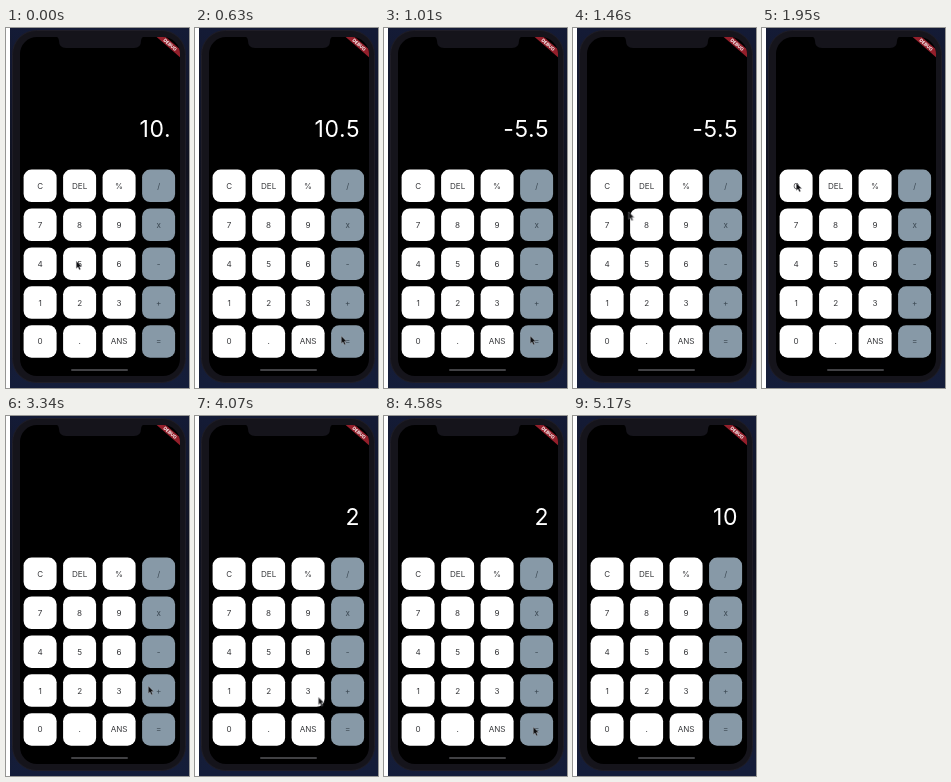
An HTML page that plays this animation: 183 by 360 pixels, repeating every 5.24 s.

```html
<!DOCTYPE html>
<html lang="en">
<head>
<meta charset="utf-8">
<title>Calculator</title>
<style>
html, body { margin: 0; width: 100%; height: 100%; overflow: hidden; background: #fff; }
svg { display: block; width: 100vw; height: 100vh; }
text { font-family: Inter, Roboto, sans-serif; }
.key { font-size: 8.1px; text-anchor: middle; fill: #38393c; }
.key.op { fill: #3a4751; }
.reading { font-size: 23px; letter-spacing: .6px; text-anchor: end; fill: #fff; }
#readings { animation: readings 5240ms step-end infinite; }
#pointer { animation: pointer 5240ms ease-in-out infinite; }

/* Each reading sits 40px below the previous one */
@keyframes readings {
  0% { transform: translateY(0); }
  2.7% { transform: translateY(-40px); }
  17.4% { transform: translateY(-80px); }
  34.5% { transform: translateY(-120px); }
  49.8% { transform: translateY(-160px); }
  61% { transform: translateY(-200px); }
  71.8% { transform: translateY(-240px); }
  90.07%, 100% { transform: translateY(-280px); }
}
@keyframes pointer {
  0%, 4% { transform: translate(70px, 233px); }
  11.4%, 22.5% { transform: translate(146px, 308px); animation-timing-function: ease-in; }
  27.86% { transform: translate(55.5px, 184px); animation-timing-function: ease-out; }
  32.4%, 39.3% { transform: translate(34px, 155px); }
  45.8%, 51.9% { transform: translate(73px, 198px); }
  58.8%, 63.8% { transform: translate(142px, 270px); }
  70.2%, 73.4% { transform: translate(72px, 273px); animation-timing-function: ease-in; }
  77.67% { transform: translate(123px, 281px); animation-timing-function: ease-out; }
  81.7%, 94% { transform: translate(149px, 311px); animation-timing-function: ease-in; }
  98.5%, 100% { transform: translate(185px, 306px); }
}
</style>
</head>
<body>
<svg viewBox="0 0 183 360" preserveAspectRatio="none">
  <defs>
    <linearGradient id="desk" x2="0" y2="1">
      <stop offset="0" stop-color="#141b36"/>
      <stop offset=".4" stop-color="#10121f"/>
      <stop offset=".75" stop-color="#191c30"/>
      <stop offset="1" stop-color="#141d3a"/>
    </linearGradient>
    <clipPath id="screen"><rect x="14" y="9" width="160" height="339" rx="17"/></clipPath>
    <clipPath id="display"><rect x="14" y="84" width="160" height="32"/></clipPath>
  </defs>
  <rect x="4" width="179" height="360" fill="url(#desk)"/>
  <rect x="6.5" y="2.5" width="173" height="352" rx="24" fill="#15141b" stroke="#1f1d26"/>
  <g clip-path="url(#screen)">
    <rect x="14" y="9" width="160" height="339" fill="#000"/>
    <path d="M49 8Q53 9 53 13Q53 20 60 20H128Q135 20 135 13Q135 9 139 8Z" fill="#15141b"/>
    <g transform="translate(164.2 16.8) rotate(41)">
      <rect x="-24" y="-3" width="48" height="6" fill="#941f2b"/>
      <text y="1.7" font-size="4.6" font-weight="700" text-anchor="middle" fill="#fff">DEBUG</text>
    </g>
    <rect x="65" y="341" width="57" height="2" rx="1" fill="#414144"/>
  </g>
  <g clip-path="url(#display)"><g id="readings"></g></g>
  <g id="keys"></g>
  <path id="pointer" d="M.3 0V7.4L2 5.9L3.3 8.8L4.6 8.2L3.4 5.4H5.7Z" fill="#101012" stroke="#b4b4b8" stroke-width=".4"/>
</svg>
<script>
const add = (parent, tag, attrs, content = "") => {
  const node = document.createElementNS("http://www.w3.org/2000/svg", tag);
  for (const name in attrs) node.setAttribute(name, attrs[name]);
  node.textContent = content;
  parent.append(node);
};

const readings = document.getElementById("readings");
["10.", "10.5", "-5.5", "", "8", "", "2", "10"].forEach((value, i) =>
  add(readings, "text", { class: "reading", x: 165.2, y: 108.7 + 40 * i }, value));

const keys = document.getElementById("keys");
"C DEL % / 7 8 9 x 4 5 6 - 1 2 3 + 0 . ANS =".split(" ").forEach((label, i) => {
  const column = i % 4;
  const x = 17.6 + 39.5 * column;
  const y = 141.6 + 38.9 * Math.floor(i / 4);
  const isOp = column === 3;
  add(keys, "rect", { x, y, width: 33, height: 32.5, rx: 8, fill: isOp ? "#8799a7" : "#fff" });
  add(keys, "text", { class: isOp ? "key op" : "key", x: x + 16.5, y: y + 19.2 }, label);
});
</script>
</body>
</html>
```
